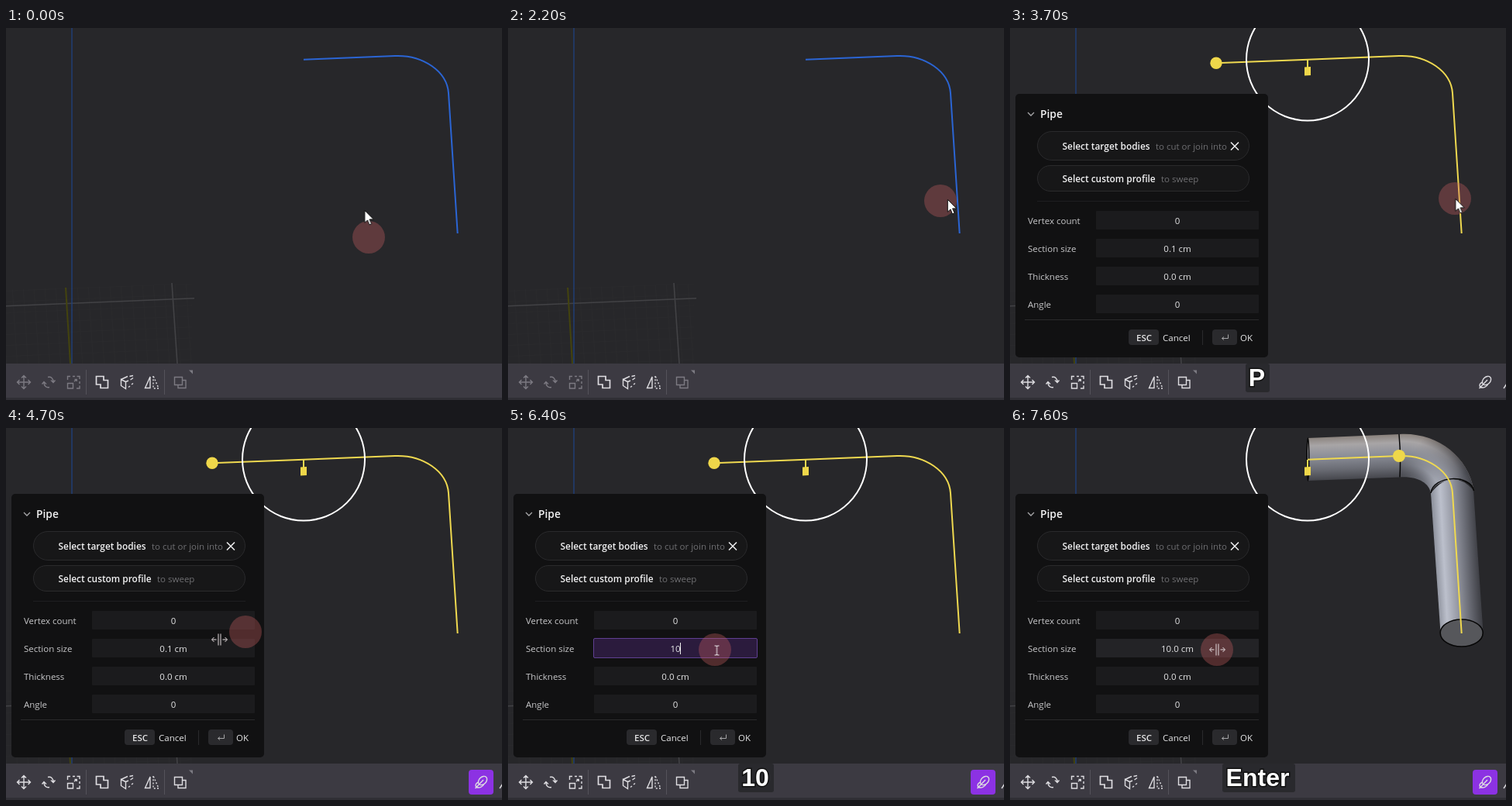
An HTML page that plays this animation: 640 by 480 pixels, repeating every 8 s.

```html
<!DOCTYPE html>
<html lang="en">
<head>
<meta charset="utf-8">
<title>Pipe command</title>
<style>
html, body { margin: 0; width: 100%; height: 100%; overflow: hidden; background: #27272a; }
svg { display: block; width: 640px; height: 480px; }
text { font: 11.5px "Open Sans", "Noto Sans", sans-serif; fill: #e6e6e7; }
.mid { text-anchor: middle; }
.strong { font-weight: 600; font-size: 11.9px; fill: #f2f2f3; }
.label { fill: #c8c8ca; }
.hint { fill: #6f6f72; }
.key text { font: 700 32px "Liberation Sans", Arial, sans-serif; fill: #fff; stroke: #111; stroke-width: 3px; paint-order: stroke; text-anchor: middle; }
.key rect { fill: #29292d; }
.icon { fill: none; stroke: #dedde1; stroke-width: 1.4; }
.line { fill: none; stroke-width: 2; }

/* one shared 8 s clock, hard steps */
.t { animation: 8s step-end infinite; }
.off { opacity: 0; }

.ring { animation-name: ring; }
.pointer { animation-name: pointer; }
.arrow { animation-name: arrow; }
.resize { animation-name: resize; }
.beam { animation-name: beam; }
.curve { stroke: #2b65d4; animation-name: curve; }
.tools { stroke: #7c7a82; animation-name: tools; }
.extra { animation-name: extra; }
.panel { animation-name: panel; }
.active { animation-name: active; }
.k2 { animation-name: k2; }
.kp { animation-name: kp; }
.k1 { animation-name: one; }
.k10 { animation-name: ten; }
.kenter { animation-name: enter; }
.small { animation-name: small; }
.edit { animation-name: edit; }
.picked { animation-name: picked; }
.typed1 { animation-name: one; }
.typed10 { animation-name: ten; }
.caret { animation-name: caret; }
.stub { animation-name: stub; }
.done { animation-name: enter; }

@keyframes ring {
  0% { transform: translate(468px, 270px); }
  1.25% { transform: translate(463px, 241px); }
  2.5% { transform: translate(462px, 235px); }
  23.75% { transform: translate(466px, 235px); }
  25% { transform: translate(489px, 232px); }
  26.25% { transform: translate(529px, 227px); }
  27.5% { transform: translate(558px, 223px); }
  28.75% { transform: translate(571px, 221px); }
  30% { transform: translate(574px, 220px); }
  55% { transform: translate(563px, 222px); }
  56.25% { transform: translate(497px, 232px); }
  57.5% { transform: translate(397px, 248px); }
  58.75% { transform: translate(309px, 263px); }
  60% { transform: translate(242px, 300px); }
  61.25% { transform: translate(221px, 321px); }
  65% { transform: translate(226px, 317px); }
  66.25% { transform: translate(244px, 303px); }
  67.5% { transform: translate(261px, 290px); }
  68.75%, 100% { transform: translate(267px, 286px); }
}
@keyframes pointer {
  0% { transform: translate(462.5px, 235px); }
  23.75% { transform: translate(474px, 234px); }
  25% { transform: translate(508px, 230px); }
  26.25% { transform: translate(545px, 225px); }
  27.5% { transform: translate(567px, 221px); }
  28.75% { transform: translate(574px, 220px); }
  30% { transform: translate(574.5px, 220px); }
  55% { transform: translate(534px, 226px); }
  56.25% { transform: translate(452px, 240px); }
  57.5% { transform: translate(352px, 256px); }
  58.75% { transform: translate(275.5px, 273px); }
  60% { transform: translate(229px, 312px); }
  61.25% { transform: translate(221px, 321px); }
  65% { transform: translate(235px, 310px); }
  66.25% { transform: translate(253px, 295px); }
  67.5% { transform: translate(266px, 287px); }
  68.75%, 100% { transform: translate(267.5px, 286px); }
}
@keyframes arrow { 0% { opacity: 1; } 58.75%, 100% { opacity: 0; } }
@keyframes resize { 0%, 70% { opacity: 0; } 58.75%, 92.5%, 100% { opacity: 1; } }
@keyframes beam { 0%, 92.5% { opacity: 0; } 70% { opacity: 1; } }
@keyframes curve { 0% { stroke: #2b65d4; } 28.75% { stroke: #f4ecab; } 32.5%, 100% { stroke: #efd950; } }
@keyframes tools { 0% { stroke: #7c7a82; } 33.75%, 100% { stroke: #dedde1; } }
@keyframes extra { 0% { opacity: 0; } 33.75%, 100% { opacity: 1; } }
@keyframes panel { 0% { opacity: 0; } 46.25%, 100% { opacity: 1; } }
@keyframes active { 0% { opacity: 0; } 48.75%, 100% { opacity: 1; } }
@keyframes k2 { 0%, 27.5% { opacity: 0; } 18.75% { opacity: 1; } }
@keyframes kp { 0%, 53.75% { opacity: 0; } 45% { opacity: 1; } }
@keyframes one { 0%, 78.75% { opacity: 0; } 76.25% { opacity: 1; } }
@keyframes ten { 0%, 91.25% { opacity: 0; } 78.75% { opacity: 1; } }
@keyframes enter { 0% { opacity: 0; } 91.25%, 100% { opacity: 1; } }
@keyframes small { 0% { opacity: 1; } 70%, 100% { opacity: 0; } }
@keyframes edit { 0%, 91.25% { opacity: 0; } 70% { opacity: 1; } }
@keyframes picked { 0%, 76.25% { opacity: 0; } 70% { opacity: 1; } }
@keyframes caret { 0% { opacity: 1; } 86.25%, 100% { opacity: 0; } }
@keyframes stub { 0%, 91.25% { opacity: 0; } 46.25% { opacity: 1; } }
</style>
</head>
<body>
<svg viewBox="0 0 640 480">
  <defs>
    <pattern id="mesh" width="14" height="14" patternUnits="userSpaceOnUse" patternTransform="matrix(1 -.04 .065 1 0 2)">
      <path d="M0 0H14M0 0V14" stroke="#2b2b2e" fill="none"/>
    </pattern>
    <!-- light from the upper left -->
    <linearGradient id="across" gradientUnits="userSpaceOnUse" x1="442" y1="11" x2="444" y2="66">
      <stop offset="0" stop-color="#8c847f"/>
      <stop offset=".18" stop-color="#a8a5a6"/>
      <stop offset=".45" stop-color="#8b8e98"/>
      <stop offset=".75" stop-color="#6a6c74"/>
      <stop offset="1" stop-color="#45464c"/>
    </linearGradient>
    <linearGradient id="down" gradientUnits="userSpaceOnUse" x1="549" y1="174" x2="604" y2="171">
      <stop offset="0" stop-color="#8f939e"/>
      <stop offset=".2" stop-color="#bcc0cc"/>
      <stop offset=".45" stop-color="#989ba6"/>
      <stop offset=".75" stop-color="#686a73"/>
      <stop offset="1" stop-color="#404147"/>
    </linearGradient>
    <radialGradient id="bendTop" gradientUnits="userSpaceOnUse" cx="506" cy="86" r="92" gradientTransform="matrix(1 0 0 .85 0 12.9)">
      <stop offset=".32" stop-color="#45464c"/>
      <stop offset=".49" stop-color="#6a6c74"/>
      <stop offset=".69" stop-color="#8b8e98"/>
      <stop offset=".88" stop-color="#a8a5a6"/>
      <stop offset="1" stop-color="#8c847f"/>
    </radialGradient>
    <radialGradient id="bendSide" href="#bendTop" gradientUnits="userSpaceOnUse" cx="506" cy="86" r="92" gradientTransform="matrix(1 0 0 .85 0 12.9)">
      <stop offset=".38" stop-color="#8f939e"/>
      <stop offset=".52" stop-color="#bcc0cc"/>
      <stop offset=".67" stop-color="#989ba6"/>
      <stop offset=".85" stop-color="#686a73"/>
      <stop offset="1" stop-color="#404147"/>
    </radialGradient>
    <linearGradient id="sweep" gradientUnits="userSpaceOnUse" x1="520" y1="30" x2="575" y2="74">
      <stop offset="0" stop-color="#000"/>
      <stop offset="1" stop-color="#fff"/>
    </linearGradient>
    <mask id="turn" maskUnits="userSpaceOnUse" x="0" y="0" width="640" height="480">
      <rect width="640" height="480" fill="url(#sweep)"/>
    </mask>
    <path id="elbow" d="M502.500 8C550 5 591 36 598.500 80Q594 66 570 66Q547 70 543 84C541 71 526 62 502.500 63.500Z"/>
    <path id="rail" d="M384 40.700L502 36C538.400 34.600 569 56 571 84L582.700 265"/>
    <g id="pipeIcon">
      <ellipse rx="6.500" ry="4.600" transform="translate(2 -2) rotate(-45)"/>
      <path d="M-7.500 8L3 -3M-3 0C-7 1 -8 4 -6 6.500C-2 8 2 6 3.500 3"/>
    </g>
  </defs>

  <!-- viewport -->
  <rect width="640" height="480" fill="#27272a"/>
  <path d="M0 338L240 330V433H0Z" fill="url(#mesh)"/>
  <path d="M0 358.800L243 348.800M214 329L221 433" stroke="#424245" stroke-width="1.600"/>
  <path d="M77 335L83 433" stroke="#43430e" stroke-width="2"/>
  <path d="M85 0V433" stroke="#20407a" stroke-width="1.400"/>

  <!-- solid -->
  <g class="t off done">
    <path d="M384 13L503 8V63.500L384 68Z" fill="url(#across)"/>
    <path d="M543 84Q570 50 598 80L610.500 264H555.500Z" fill="url(#down)"/>
    <use href="#elbow" fill="url(#bendTop)"/>
    <use href="#elbow" fill="url(#bendSide)" mask="url(#turn)"/>
    <ellipse cx="582.700" cy="264.500" rx="27.500" ry="17.500" fill="#56575b" stroke="#070707" stroke-width="1.600"/>
    <path d="M502 8Q504.500 36 503 63.500M543 84C546 61 594 59 598.500 81" fill="none" stroke="#070707" stroke-width="1.500"/>
    <ellipse cx="384.500" cy="40.500" rx="1.300" ry="27.500" fill="none" stroke="#070707" stroke-width="1.400"/>
  </g>
  <use href="#rail" class="t line curve"/>

  <!-- handles -->
  <g class="t off stub" fill="#efd74a">
    <path d="M266 45.300L384 40.700" stroke="#efd950" stroke-width="2"/>
    <circle cx="266" cy="45.300" r="7.700"/>
  </g>
  <circle class="t off done" cx="502" cy="36" r="8" fill="#efd74a"/>
  <g class="t off panel">
    <circle cx="384" cy="40.500" r="79" fill="none" stroke="#fff" stroke-width="2"/>
    <path d="M384 41V52" stroke="#efd950" stroke-width="2"/>
    <path d="M380 50.500L388 50V61L380 61.500Z" fill="#efd74a"/>
  </g>

  <!-- toolbar -->
  <rect y="433" width="640" height="47" fill="#3c3a42"/>
  <rect y="477" width="640" height="3" fill="#302f35"/>
  <path d="M103.500 441V473M204.500 441V473" stroke="#54525a"/>
  <g class="t icon tools">
    <path d="M14.500 457H31.500M23 448.500V465.500M17.500 454l-3 3 3 3M28.500 454l3 3-3 3M20 451.500l3-3 3 3M20 462.500l3 3 3-3"/>
    <path d="M54 450.500C58 449.500 61 452 61 457M58 454.500l3 3 2.500-3M56 463.500C52 464.500 49 462 49 457M46.500 459.500l2.500-3 3 3"/>
    <path d="M79.500 454V449.500H83M86 449.500H89M91.500 449.500H95V453M95 456V459M95 461.500V465H91M79.500 458.500H86.500V465H79.500ZM88 456L91 453.500M88.500 453.500H91.200V456"/>
    <path d="M217.500 450.500H227.500V460.500H217.500ZM228 454.500H232V464.500H222V461"/>
  </g>
  <path d="M236 441.500H241V446.500Z" fill="#7c7a82"/>
  <g class="icon">
    <path d="M116.500 449.500H126V454.500H131.500V464.500H122V460H116.500Z" stroke-width="1.700"/>
    <path d="M148.500 453.500L154.500 456.500V465.500L148.500 461.500ZM148.500 453.500L157 449.500M154.500 456.500L158 455"/>
    <path d="M159.500 449.500L164 448.500M160.500 454L164 451.500M158 463.500L160 462M162 460L164 458.500"/>
    <path d="M186 450V464.500H179.500Z"/>
    <path d="M190 449V465H197L190.500 450" stroke-dasharray="2 2.200"/>
  </g>
  <g class="t off extra">
    <rect class="t off active" x="597" y="441" width="32" height="32" rx="4" fill="#8c32e3"/>
    <g class="icon">
      <use href="#pipeIcon" x="613" y="457"/>
      <path d="M637 465L641 459"/>
    </g>
  </g>

  <!-- dialog -->
  <g class="t off panel">
    <rect x="7" y="85" width="326" height="340" rx="5" fill="#111112"/>
    <path d="M23 109l4 4 4-4" fill="none" stroke="#a8a8aa" stroke-width="1.300"/>
    <text class="strong" x="39" y="116" style="font-size:13.8px">Pipe</text>
    <g fill="#171718" stroke="#2a2a2c">
      <rect x="35.500" y="133.500" width="273" height="37" rx="18.500"/>
      <rect x="35.500" y="177.500" width="273" height="33" rx="16.500"/>
    </g>
    <text class="strong" x="67.500" y="157">Select target bodies</text>
    <text class="hint" x="188" y="157">to cut or join into</text>
    <path d="M285 147.500l10 10M295 147.500l-10 10" stroke="#ececed" stroke-width="1.600"/>
    <text class="strong" x="67.500" y="199">Select custom profile</text>
    <text class="hint" x="195" y="199">to sweep</text>
    <path d="M35 223.500H309" stroke="#1f1f21"/>
    <path d="M19 376.500H321M248.500 390V409" stroke="#2a2a2c"/>

    <g fill="#1b1b1d">
      <rect x="111" y="236" width="210" height="24" rx="1"/>
      <rect x="111" y="272" width="210" height="24" rx="1"/>
      <rect x="111" y="308" width="210" height="24" rx="1"/>
      <rect x="111" y="344" width="210" height="24" rx="1"/>
    </g>
    <text class="label" x="23" y="253">Vertex count</text>
    <text class="label" x="23" y="289">Section size</text>
    <text class="label" x="23" y="325">Thickness</text>
    <text class="label" x="23" y="361">Angle</text>
    <text class="mid" x="216" y="253">0</text>
    <text class="mid" x="216" y="325">0.0 cm</text>
    <text class="mid" x="216" y="361">0</text>

    <text class="t mid small" x="216" y="289">0.1 cm</text>
    <g class="t off edit">
      <rect x="110.500" y="271.500" width="211" height="25" rx="1.500" fill="#2b1b3d" stroke="#5f3f91"/>
      <g class="t off picked">
        <rect x="207" y="277" width="18" height="15" fill="#5a3a8c"/>
        <text class="mid" x="216" y="289">0.1</text>
      </g>
      <g class="t off typed1">
        <text class="mid" x="216" y="289">1</text>
        <path d="M219.500 277V292" stroke="#eee"/>
      </g>
      <g class="t off typed10">
        <text class="mid" x="216" y="289">10</text>
        <path class="t caret" d="M222.500 277V292" stroke="#eee"/>
      </g>
    </g>
    <g class="t off done">
      <rect x="111" y="272" width="210" height="24" rx="1" fill="#232326"/>
      <text class="mid" x="216" y="289">10.0 cm</text>
    </g>

    <g fill="#2a2a2d">
      <rect x="153" y="389" width="39" height="20" rx="4"/>
      <rect x="261" y="389" width="32" height="20" rx="4"/>
    </g>
    <text class="mid" x="173" y="404" style="font-weight:600">ESC</text>
    <text x="197" y="404">Cancel</text>
    <path d="M281.500 395.500V400.500H273.500M276 398.500l-2.500 2 2.500 2" fill="none" stroke="#a4a4a6"/>
    <text x="297" y="404">OK</text>
  </g>

  <!-- pressed keys -->
  <g class="t off key k2"><rect x="304" y="433" width="30" height="37" rx="3"/><text x="318.500" y="462">2</text></g>
  <g class="t off key kp"><rect x="304" y="433" width="31" height="37" rx="3"/><text x="318.500" y="462">P</text></g>
  <g class="t off key k1"><rect x="304" y="433" width="30" height="37" rx="3"/><text x="318.500" y="462">1</text></g>
  <g class="t off key k10"><rect x="297" y="433" width="46" height="37" rx="3"/><text x="319" y="462">10</text></g>
  <g class="t off key kenter"><rect x="274" y="433" width="94" height="37" rx="3"/><text x="319.500" y="462">Enter</text></g>

  <!-- mouse -->
  <circle class="t ring" r="21" fill="#c85f62" fill-opacity=".35"/>
  <g class="t pointer">
    <path class="t arrow" d="M.3 .3V16.300L4 12.900L6.500 18.900L9.100 17.800L6.600 11.900H11.700Z" fill="#fff" stroke="#111"/>
    <path class="t off resize" d="M-1.500 -7.500V7.500M1.500 -7.500V7.500M-4 0H-10M4 0H10M-7 -3l-3 3 3 3M7 -3l3 3-3 3" fill="none" stroke="#e4dcde"/>
    <path class="t off beam" d="M-1 -5H1L2 -4L3 -5H5M2 -4V6M-1 7H1L2 6L3 7H5" fill="none" stroke="#e6e0e4" stroke-width="1.100"/>
  </g>
</svg>
</body>
</html>
```
